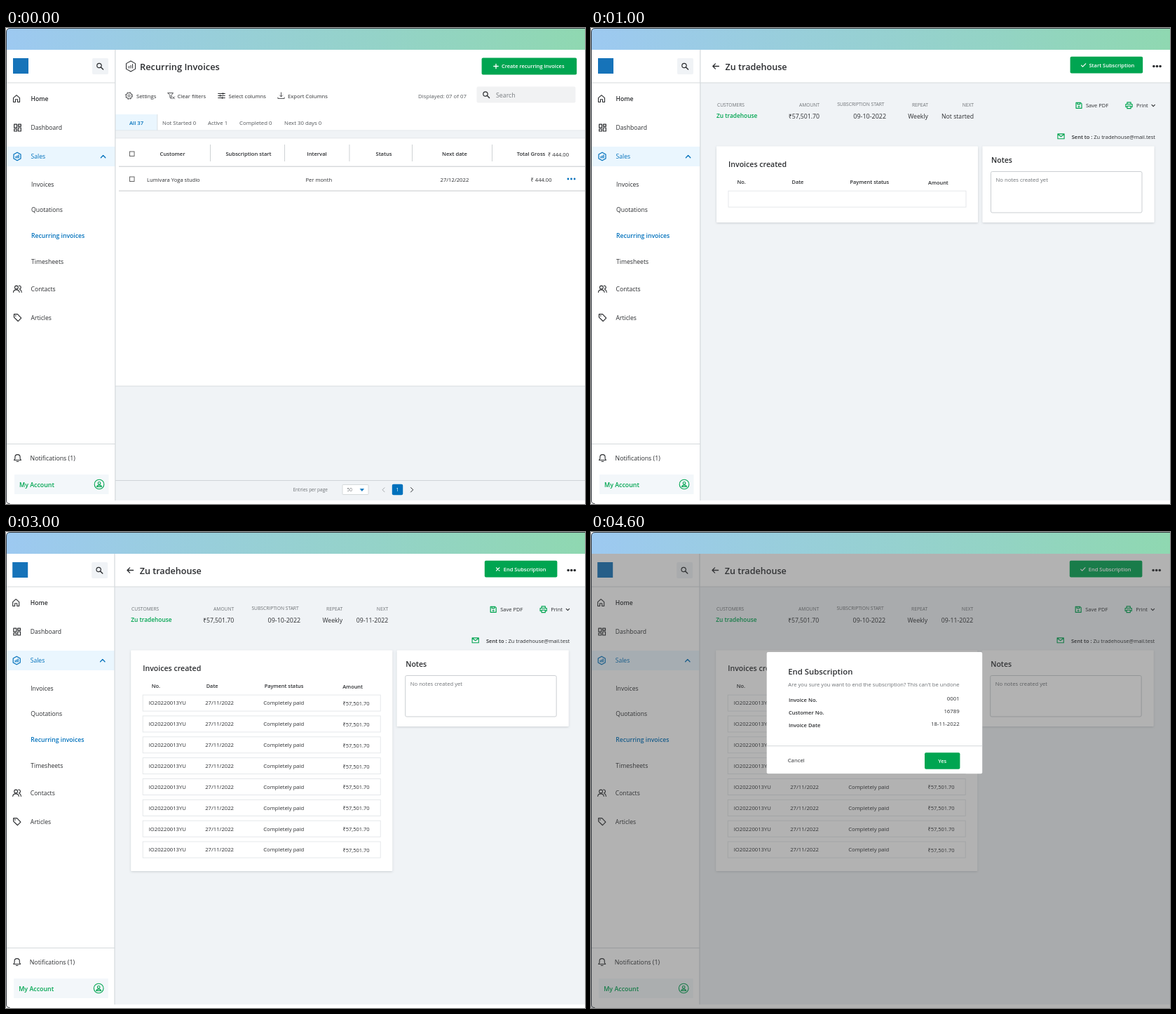
Animation, 826 px wide and 678 px high, one loop 5 s. Source, as an HTML page:

```html
<!DOCTYPE html>
<html lang="en">
<head>
<meta charset="utf-8">
<title>Recurring invoices</title>
<style>
html, body { margin: 0; width: 100%; height: 100%; overflow: hidden; background: #fff; }
svg { display: block; width: 826px; height: 678px; font-family: "Open Sans", "Noto Sans", sans-serif; }
text { white-space: pre; }
</style>
</head>
<body>
<svg id="stage" viewBox="0 0 826 678"></svg>
<script>
const INK = '#2b2d30', GREEN = '#00a551', BLUE = '#0071bc', GREY = '#f0f3f6', LINE = '#d5d9dc', MUTED = '#6e7276';
const CLIENT = 'Zu tradehouse';

const rect = (x, y, w, h, fill, extra = '') =>
  `<rect x="${x}" y="${y}" width="${w}" height="${h}" fill="${fill}" ${extra}/>`;
const path = (d, color = INK, width = 1.1, fill = 'none') =>
  `<path d="${d}" fill="${fill}" stroke="${color}" stroke-width="${width}" stroke-linecap="round" stroke-linejoin="round"/>`;
const circle = (x, y, r, color = INK, width = 1.1, fill = 'none', extra = '') =>
  `<circle cx="${x}" cy="${y}" r="${r}" fill="${fill}" stroke="${color}" stroke-width="${width}" ${extra}/>`;
const move = (x, y, body) => `<g transform="translate(${x} ${y})">${body}</g>`;
// y is the middle of the capital letters
const text = (x, y, str, size = 7.7, color = INK, weight = 400, anchor = 'start') =>
  `<text x="${x}" y="${y + size * .36}" font-size="${size}" fill="${color}" font-weight="${weight}" text-anchor="${anchor}">${str}</text>`;
const bold = (x, y, str, size = 7.5, color = INK, anchor) => text(x, y, str, size, color, 600, anchor);
const dots = (x, y, r, gap, color) =>
  [-gap, 0, gap].map(d => circle(x + d, y, r, 'none', 0, color)).join('');
const button = (x, y, w, h, label) =>
  rect(x, y, w, h, GREEN, 'rx="2"') + label;

// Icons are centred on 0,0
const icon = {
  search: circle(-1, -1, 3.2, INK, 1.2) + path('M1.5 1.5 4.6 4.6', INK, 1.4),
  home: path('M-4.5 -.8 0 -4.8 4.5 -.8V5H1.6V1.2H-1.6V5H-4.5Z'),
  board: path('M-4.8 -4.8h3.8v5h-3.8z M1 -4.8h3.8v3H1z M-4.8 2h3.8v3h-3.8z M1 0h3.8v5H1z', INK, 1.2),
  chart: (color, width) => path('M0 -5.8 5 -3V3L0 5.8 -5 3V-3Z M-2 2V0 M0 2V-1 M2 2V-2.2', color, width),
  people: circle(-1.6, -2, 2.4) + path('M-6 5C-5.5 .2 2 .2 2.6 5 M2 -4.4c3.4 -.4 3.6 4 .8 4.6 M3.4 1C5 1.6 5.6 3 5.8 5'),
  tag: path('M-5 -4.8H0L5.2 .6 .8 5.2 -5 -.4Z', INK, 1.2) + circle(-2.7, -2.6, .5, INK, .6, INK),
  bell: path('M-5 3H5L3.6 1V-1.4C3.6 -6 -3.6 -6 -3.6 -1.4V1Z M-1.4 5h2.8'),
  user: circle(0, 0, 6.8, GREEN, 1.1) + circle(0, -1.7, 1.8, GREEN) + path('M-3.4 3.4C-3 .4 3 .4 3.4 3.4Z', GREEN),
  gear: circle(0, 0, 4.8, INK, 1, 'none', 'stroke-dasharray="2.2 1.57"') + circle(0, 0, 4, INK, .7) + circle(0, 0, 1.5, INK, .8),
  filter: path('M-4.5 -4H3L.4 -.6V4L-1.6 2.6V-.6Z M2 1.4l3 3 M5 1.4l-3 3', INK, .8),
  sliders: path('M-4.8 -3h9.6 M-4.8 0h9.6 M-4.8 3h9.6 M2 -4v2 M-2 -1v2 M1 2v2', INK, 1),
  download: path('M0 -4.6V1.4 M-2 -.6 0 1.4 2 -.6 M-4.6 2.4V4H4.6V2.4', INK, .8),
  save: path('M-4 -4H2.4L4 -2.4V4H-4Z M-2 -4V-1.6H1.6V-4', GREEN, 1.2) + circle(0, 1.6, 1, GREEN, 1),
  print: path('M-2.6 -1.8V-4.4H2.6V-1.8 M-2.6 2.2H-4.6V-1.8H4.6V2.2H2.6 M-2.6 .8H2.6V4.4H-2.6Z', GREEN, 1.2),
  mail: path('M-4.6 -3.4H4.6V3.4H-4.6Z M-4.4 -3 0 .4 4.4 -3', GREEN, 1.1),
  back: path('M4.4 0H-4.2 M-.6 -3.6 -4.2 0 -.6 3.6', INK, 1.3),
  check: path('M-3 .2 -1 2.2 3.2 -2.2', '#fff', 1.2),
  cross: path('M-2.2 -2.2 2.2 2.2 M2.2 -2.2 -2.2 2.2', '#fff', 1.2),
};
const put = (name, x, y) => move(x, y, icon[name]);

function sidebar() {
  const items = [['home', 100.5, 'Home', 600], ['board', 142, 'Dashboard'], ['people', 371.5, 'Contacts'], ['tag', 412.5, 'Articles']];
  const subs = [['Invoices', 222.5], ['Quotations', 259], ['Recurring invoices', 296], ['Timesheets', 332.5]];
  return rect(0, 31, 156, 647, '#fff') +
    rect(10, 43, 22, 22, '#1673b9') +
    rect(123, 43, 23, 23, GREY, 'rx="2"') + put('search', 134, 54.5) +
    rect(0, 77.5, 156, 1, LINE) +
    rect(0, 169, 156, 28, '#eaf6fe') +
    move(16, 183, icon.chart(BLUE, 1.2)) + text(35.5, 183, 'Sales', 8.6, BLUE) +
    path('M135.4 184.8 138.6 181.4 141.8 184.8', BLUE, 1.3) +
    items.map(([i, y, label, w]) => put(i, i == 'home' ? 15 : 16.5, y) + text(35.5, y, label, 8.65, INK, w)).join('') +
    subs.map(([label, y]) => label[0] == 'R' ? bold(36, y, label, 8.65, BLUE) : text(36, y, label, 8.65)).join('') +
    rect(0, 592, 156, 1, LINE) +
    put('bell', 16.5, 612.5) + text(34.5, 612.5, 'Notifications (1)', 8.8) +
    rect(12, 636, 134.5, 28, '#f3f7fa') + bold(19, 651, 'My Account', 8.85, GREEN) + put('user', 133, 650) +
    rect(155.2, 31, 1.2, 642, LINE);
}

function listPage() {
  const tools = [['gear', 175.5, 186, 'Settings'], ['filter', 235.5, 244.5, 'Clear filters'],
    ['sliders', 307.5, 317.5, 'Select columns'], ['download', 392.5, 402, 'Export Columns']];
  const tabs = [[223, 'Not Started 0'], [288, 'Active 1'], [333, 'Completed 0'], [397, 'Next 30 days 0']];
  const heads = [[237.5, 'Customer'], [346, 'Subscription start'], [443.5, 'Interval'], [539, 'Status'], [640, 'Next date'], [749, 'Total Gross']];
  const box = y => rect(176.5, y - 3, 6.5, 6.5, '#fff', 'stroke="#555" stroke-width=".9"');
  return rect(156, 31, 670, 642, GREY) +
    rect(156, 31, 670, 115, '#fff') +
    move(178, 54.5, `<g transform="scale(1.3)">${icon.chart(INK, .8)}</g>`) +
    bold(191, 55.5, 'Recurring Invoices', 12.85) +
    button(678.6, 42.6, 135.6, 23.8, path('M695.8 54.5h6.4 M699 51.3v6.4', '#fff', 1.3) + bold(707, 54.8, 'Create recurring invoices', 7.45, '#fff')) +
    tools.map(([i, x, tx, label]) => put(i, x, 96.5) + text(tx, 97, label, 7.65)).join('') +
    text(588, 97, 'Displayed: 07 of 07', 7.8, '#55595d') +
    rect(671.5, 83.5, 141, 23, '#f1f2f3', 'rx="2"') + put('search', 685, 95) + text(699, 95.5, 'Search', 8.8, '#777b7f') +
    rect(156, 123, 60, 23, '#eaf6fe') + rect(215.5, 123, .8, 23, LINE) + rect(156, 145.5, 670, .8, '#e0e4e7') +
    bold(176, 135, 'All 37', 7.7, BLUE) +
    tabs.map(([x, label]) => text(x, 135, label, 7.8, '#505458')).join('') +
    rect(156, 157, 670, 353, '#fff') + rect(156, 156.5, 670, .8, '#e0e4e7') + rect(156, 509.5, 670, 1.2, '#dde1e4') +
    box(179) + heads.map(([x, label]) => bold(x, 179, label, 7.6, INK, 'middle')).join('') +
    text(773, 180.5, '₹ 444.00', 7.6) +
    [291, 397, 489.5, 579, 693].map(x => rect(x, 166, .9, 24, '#c9cdd0')).join('') +
    rect(161, 196.7, 665, 1, '#c5c9cc') + rect(161, 231.5, 665, 1, '#c5c9cc') +
    box(215) + text(201, 216, 'Lumivara Yoga studio', 7.6) + text(427.5, 216, 'Per month', 7.6) +
    text(619.5, 216, '27/12/2022', 7.7) + text(748.5, 216, '₹ 444.00', 7.6) + dots(806.5, 215, 1.4, 4.6, BLUE) +
    rect(156, 644, 670, 1, '#cfd4d8') +
    text(409.5, 658, 'Entries per page', 6.5, MUTED) +
    rect(480, 650.5, 37, 14, '#fff', 'stroke="#cdd1d4" stroke-width=".8" rx="1"') + text(486.5, 658, '50', 6.4, MUTED) +
    path('M505.5 656.5h5l-2.5 3z', BLUE, .6, BLUE) +
    path('M540 654.8 537 657.8 540 660.8', '#a9adb0', 1) +
    rect(550.8, 649.8, 15.4, 15.4, BLUE, 'rx="2"') + text(558.5, 657.7, '1', 6.8, '#fff', 400, 'middle') +
    path('M577.5 654.6 580.7 657.8 577.5 661', INK, 1);
}

function detailPage({ mark, action, next, rows }) {
  const facts = [[219, 'CUSTOMERS', ''], [326, 'AMOUNT', '₹57,501.70'], [421, 'SUBSCRIPTION START', '09-10-2022'],
    [481, 'REPEAT', 'Weekly'], [546, 'NEXT', next]];
  const cols = [[208.5, 'No.'], [286.5, 'Date'], [369.5, 'Payment status'], [481, 'Amount']];
  const card = (x, w, h) => rect(x, 168.5, w, h, '#fff', 'rx="1" filter="url(#shade)"');
  const row = i => {
    const y = 243.7 + i * 29.85;
    return rect(196, y - 11.6, 339, 23, '#fff', 'stroke="#e2e5e8" stroke-width=".9"') +
      (rows ? text(204.5, y, 'IO20220013YU') + text(285, y, '27/11/2022') + text(368, y, 'Completely paid') + text(481.3, y + .6, '₹57,501.70', 7.5) : '');
  };
  return rect(155, 31, 673, 642, GREY) +
    rect(155, 31, 673, 47, '#fff') + rect(155, 77.5, 673, 1, LINE) +
    put('back', 178, 54.5) + bold(191.5, 55.8, CLIENT, 12.6) +
    button(683.6, 40.8, 103.6, 23.6, put(mark, 702.5, 53) + bold(710.5, 53, action, 7.5, '#fff')) +
    dots(807.5, 54.5, 1.8, 4.6, INK) +
    facts.map(([end, label, value], i) =>
      text(i == 2 ? 418.5 : end, i == 2 ? 108.5 : 109.3, label, 6.7, MUTED, 400, 'end') +
      text(end, 126.2, value, i == 2 ? 8.95 : 8.7, INK, 400, 'end')).join('') +
    bold(179, 125, CLIENT, 8.35, GREEN) +
    put('save', 696, 110.3) + text(706, 110.6, 'Save PDF', 7.5) +
    put('print', 767.5, 110.3) + text(778, 110.6, 'Print', 7.5) + path('M800 109.4 802.2 111.6 804.4 109.4', INK, 1.1) +
    put('mail', 670.5, 154.3) +
    `<text x="805" y="157.9" font-size="7.5" text-anchor="end" fill="${INK}"><tspan font-weight="600">Sent to :</tspan> ${CLIENT}@mail.test</text>` +
    card(179, 373, rows ? 314.5 : 108.5) + bold(196, 194.3, 'Invoices created', 10.6) +
    cols.map(([x, label], i) => bold(x, i == 3 ? 220.2 : 219.6, label, 7.4)).join('') +
    Array.from({ length: rows || 1 }, (_, i) => row(i)).join('') +
    card(558.5, 245, 108.5) + bold(571, 188.4, 'Notes', 10.5) +
    rect(570.5, 204.5, 215.5, 58.5, '#fff', 'stroke="#c6cacd" stroke-width=".9" rx="2"') +
    text(577.5, 216.3, 'No notes created yet', 7.7, MUTED);
}

function modal(x, y, h, title, note, facts = []) {
  return rect(0, 31, 826, 647, '#404040', 'opacity=".4"') +
    move(x, y, rect(0, 0, 307.5, h, '#fff', 'rx="2"') +
      bold(30.6, 27.5, title, 11.35) + text(30.6, 46.3, note, 7.68, MUTED) +
      facts.map(([label, value], i) =>
        bold(31.2, 68.6 + i * 17.8, label, 7.6) + text(275, 66.5 + i * 17.8, value, 7.8, INK, 400, 'end')).join('') +
      rect(0, h - 40, 307.5, .9, '#cfd3d6') +
      text(30, h - 19, 'Cancel', 7.8) +
      button(225.3, h - 30, 50.4, 23.4, bold(250.5, h - 18, 'Yes', 7.4, '#fff', 'middle')));
}

const defs = `<defs>
    <linearGradient id="sky"><stop stop-color="#9dc9f1"/><stop offset="1" stop-color="#8fd8b1"/></linearGradient>
    <filter id="shade" x="-5%" y="-5%" width="110%" height="115%"><feDropShadow dx="0" dy="1" stdDeviation="1.5" flood-color="#56616b" flood-opacity=".25"/></filter>
  </defs>`;
const border = rect(0, 0, 826, 31, 'url(#sky)') +
  '<path d="M0 0H6Q.5 .5 .5 6L0 6Z" fill="#fff"/>' +
  path('M826 .5H6Q.5 .5 .5 6V673Q.5 677.5 5 677.5', '#3a3f44', 1);

const before = { mark: 'check', action: 'Start Subscription', next: 'Not started', rows: 0 };
const after = { mark: 'cross', action: 'End Subscription', next: '09-11-2022', rows: 8 };
const nudge = body => move(-.8, 0, body);

const scenes = [
  listPage() + sidebar(),
  detailPage(before) + sidebar(),
  detailPage(before) + sidebar() +
    modal(271.3, 234, 129.3, 'Start Subscription', 'After starting recurring invoice you will not be able to edit it'),
  nudge(detailPage(after) + sidebar()),
  nudge(detailPage({ ...after, mark: 'check' }) + sidebar()) +
    modal(250.7, 171, 173.3, 'End Subscription', "Are you sure you want to end the subscription? This can't be undone",
      [['Invoice No.', '0001'], ['Customer No.', '16789'], ['Invoice Date', '18-11-2022']]),
].map(body => defs + body + border);

const stage = document.getElementById('stage');
let shown = -1;
function draw() {
  const step = Math.floor(performance.now() / 1000) % scenes.length;
  if (step !== shown) stage.innerHTML = scenes[shown = step];
  requestAnimationFrame(draw);
}
draw();
</script>
</body>
</html>
```
